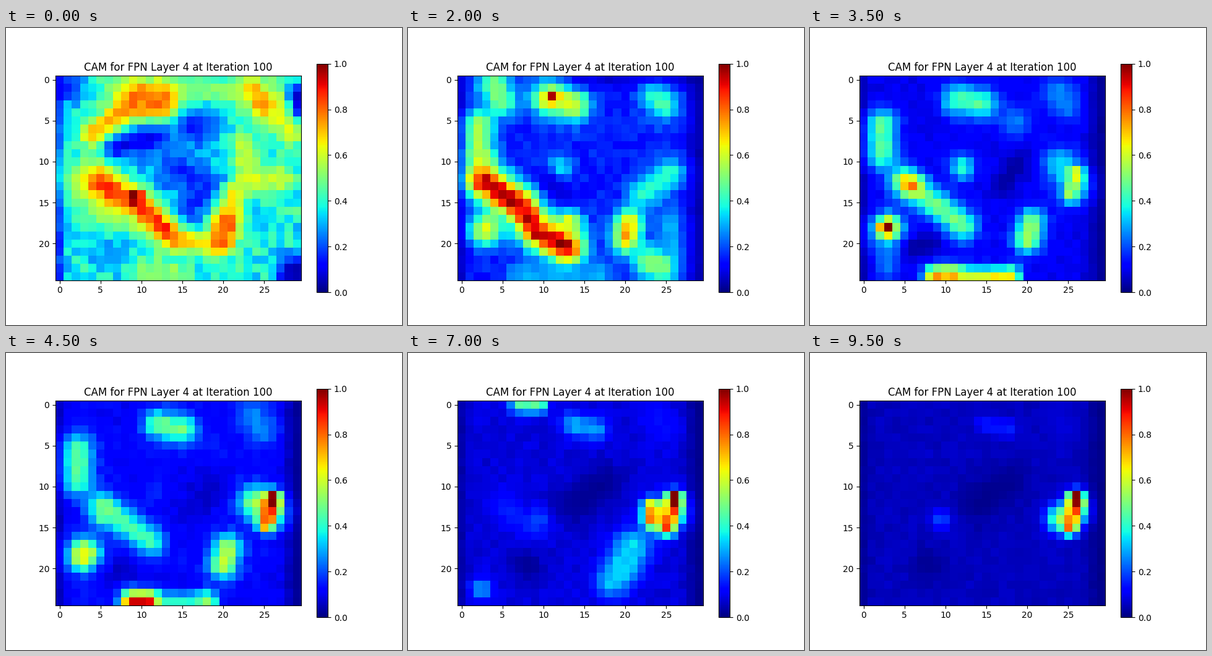
A matplotlib script that plays this animation: 640x480 px, repeating every 10000 ms.

```python
import numpy as np
import matplotlib.pyplot as plt
from matplotlib.animation import FuncAnimation

ROWS, COLS = 25, 30
FRAMES, INTERVAL = 20, 500
Y, X = np.mgrid[0:ROWS, 0:COLS].astype(float)


def distance(points):
    """Distance of every cell to a point or polyline."""
    nearest = np.full(X.shape, np.inf)
    for (x0, y0), (x1, y1) in zip(points, points[1:] or points):
        dx, dy = x1 - x0, y1 - y0
        along = ((X - x0) * dx + (Y - y0) * dy) / (dx * dx + dy * dy or 1)
        along = np.clip(along, 0, 1)
        nearest = np.minimum(nearest, np.hypot(X - x0 - along * dx,
                                               Y - y0 - along * dy))
    return nearest


def falloff(points, radius):
    return np.exp(-(distance(points) / radius) ** 2)


def fade(t, peak, span):
    """Flat-topped rise and fall around one time."""
    return np.exp(-((t - peak) / span) ** 4)


class Field:
    def __init__(self, base):
        self.values = np.full((ROWS, COLS), float(base))

    def ridge(self, level, radius, *points):
        lift = np.maximum(level - self.values, 0)
        self.values += lift * falloff(points, radius)

    def hollow(self, depth, radius, *points):
        self.values *= 1 - depth * falloff(points, radius)

    def speckle(self, amount, rng):
        self.values *= 1 + amount * rng.uniform(-1, 1, self.values.shape)


def darken_edges(field, t):
    field.values *= 1 - 0.5 * np.exp(-X / 0.7)
    settled = 1 - np.exp(-t / 2)
    field.values *= 1 - 0.8 * settled * np.exp(-((COLS - 1 - X) / 1.6) ** 2)


def opening_ring(field, t):
    """Wide bright ring around two dark pools."""
    on = fade(t, 0, 2.5)
    field.hollow(0.65 * on, 2.6, (13, 4.5), (17, 5.5))
    field.hollow(0.75 * on, 2.2, (7, 8), (11, 7))
    field.hollow(0.55 * on, 2.8, (14, 11), (18, 13), (15.5, 16.5))
    field.hollow(0.95 * on, 2.2, (28.5, 23.5))
    field.hollow(0.9 * on, 1.2, (29, 2), (29, 4))
    field.hollow(0.3 * on, 2.4, (6, 21))
    field.hollow(0.5 * on, 2, (1, 1))
    field.ridge(0.43 * on, 1.6, (7, 1.3), (21, 1.3))
    field.ridge(0.64 * on, 1.5, (12, 2), (8.5, 3.5), (4, 6.7))
    field.ridge(0.52 * on, 1.7, (26, 3), (28, 6.5))
    field.ridge(0.52 * on, 1.6, (22.5, 8), (23, 12), (27, 12))
    field.ridge(0.46 * on, 2.6, (2.5, 12), (6, 16))
    field.ridge(0.58 * on, 1.5, (14, 19.5), (19, 20), (21.3, 14))
    field.ridge(0.46 * on, 1.4, (10.5, 23.5), (14, 23.5))
    field.ridge(1.05 * on, 1, (9.3, 14.5))


def lingering_spots(field, t):
    """Spots that stay in place, or drift slowly, while they cool."""
    x = 11 + 0.28 * t
    field.ridge(0.68 - 0.028 * t, 2.4 - 0.07 * t, (x - 1.5, 2.4), (x + 1.5, 3))
    field.ridge(0.63 * np.exp(-t / 9), 2, (23.7, 1.5), (24.7, 3))
    field.ridge(0.5 * fade(t, 5, 6), 1.9, (2.2, 5.5), (2.2, 9))
    field.ridge(0.7 * np.cos(np.pi / 2 * t / FRAMES), 1.7,
                (20.5, 17.5), (20, 19.5))
    field.ridge(0.63 * fade(t, 6.5, 5), 2, (3, 18.3))
    field.ridge(0.43 * fade(t, 6, 3), 1.6, (12, 10.7))


def diagonal_trail(field, t):
    """Hot diagonal that sags, then shortens as it cools."""
    sag = np.exp(-((t - 4) / 2) ** 2)
    reach = np.exp(-(t / 10) ** 4)
    level = 0.75 * np.exp(-(t / 11) ** 2) + 0.22 * sag
    field.ridge(level, 1.8 + 0.4 * sag,
                (5 - 2.3 * sag, 12.3),
                (8 - 0.7 * sag, 14.5 + sag),
                (8.5 + 0.7 * reach, 15 + 3.5 * sag),
                (9 + 4 * reach, 15 + 3.3 * reach + 2.2 * sag))


def second_burst(field, t):
    on = fade(t, 4, 2.2)
    field.hollow(0.6 * on, 1.3, (10.5, 12), (12.5, 14))
    field.hollow(0.5 * on, 1.2, (14, 0), (28, 0))
    field.ridge(0.46 * on, 2, (4, 0.5), (4.8, 2.5))
    field.ridge(0.85 * on, 0.8, (11, 2))
    field.ridge(0.6 * on, 1.7, (13, 17.7))
    field.ridge(0.38 * on, 1.9, (25.5, 11.5), (22, 14))
    field.ridge(0.48 * on, 2.1, (23, 22.3), (24.3, 22.7))
    field.ridge(0.28 * on, 1.5, (25.5, 17), (25.5, 21))
    field.ridge(0.27 * on, 1.6, (7, 23.7), (17, 23.7))


def third_burst(field, t):
    on = fade(t, 7, 2.2)
    field.hollow(0.7 * on, 1.5, (19, 10), (17, 13))
    field.hollow(0.7 * on, 1.6, (6, 20.5), (8, 20))
    field.ridge(0.27 * on, 1.9, (18.5, 5))
    field.ridge(0.27 * on, 1.4, (2.7, 21), (3, 23))
    field.ridge(0.85 * on, 1.3, (5.7, 12.8))
    field.ridge(1.05 * on, 0.9, (2.8, 18))


def bottom_glow(field, t):
    on = fade(t, 8, 3.3)
    field.ridge(0.8 * on, 1.3, (8.7, 24), (11, 24))
    field.ridge(0.68 * fade(t, 7, 2.2), 1.1, (10, 24), (18, 24))
    field.ridge(0.48 * on, 1.1, (18, 24))


def closing_traces(field, t):
    """Faint marks of the second half on a nearly dark ground."""
    late = fade(t, 16, 6.5)
    field.hollow(0.75 * late, 2.6, (17.5, 9.5), (14, 12))
    field.hollow(0.7 * late, 2.2, (8, 19.5))
    field.ridge(0.8 * fade(t, 11, 2.2), 0.8, (5, 14))
    field.ridge(0.45 * fade(t, 14, 2.9), 1.1, (7, 0), (9.5, 0))
    field.ridge(0.33 * fade(t, 14, 2.6), 2.1, (21, 17.5), (18.5, 21.5))
    field.ridge(0.28 * fade(t, 14.5, 3.8), 1.3, (2.4, 22.5))
    field.ridge(0.2 * late, 1.2, (9.4, 14))


def final_target(field, t):
    """The one region that keeps growing until it dominates."""
    rise = 1 / (1 + np.exp(6 - t))
    lift = np.exp(-((t - 7) / 2.5) ** 2)
    field.ridge(0.52 * rise, 2.4 - 0.04 * t,
                (24, 13.8 - 3.5 * lift), (25.7, 13))
    field.ridge(0.78 * fade(t, 13.5, 4), 1, (23.2, 12.5), (23.3, 14))
    field.ridge(0.82 * rise, 0.95, (26, 11.5), (25.7, 13), (25.2, 15 - lift))
    field.ridge(1.05 * rise, 0.8, (26, 11.5))


def heat(step):
    rng = np.random.default_rng(step)
    cooling = 0.1 * (1 - step / FRAMES) + 0.18 * np.exp(-step / 1.2)
    field = Field(0.05 + cooling)
    field.speckle(0.2, rng)
    darken_edges(field, step)
    for layer in (opening_ring, lingering_spots, diagonal_trail, second_burst,
                  third_burst, bottom_glow, closing_traces, final_target):
        layer(field, step)
    field.speckle(0.06, rng)
    return field.values / field.values.max()


fig, ax = plt.subplots(figsize=(6.4, 4.8), dpi=100)
image = ax.imshow(heat(0), cmap="jet", vmin=0, vmax=1)
ax.set_title("CAM for FPN Layer 4 at Iteration 100")
fig.colorbar(image)


def update(step):
    image.set_data(heat(step))
    return [image]


animation = FuncAnimation(fig, update, frames=FRAMES, interval=INTERVAL,
                          repeat=True, repeat_delay=0)
plt.show()
```
